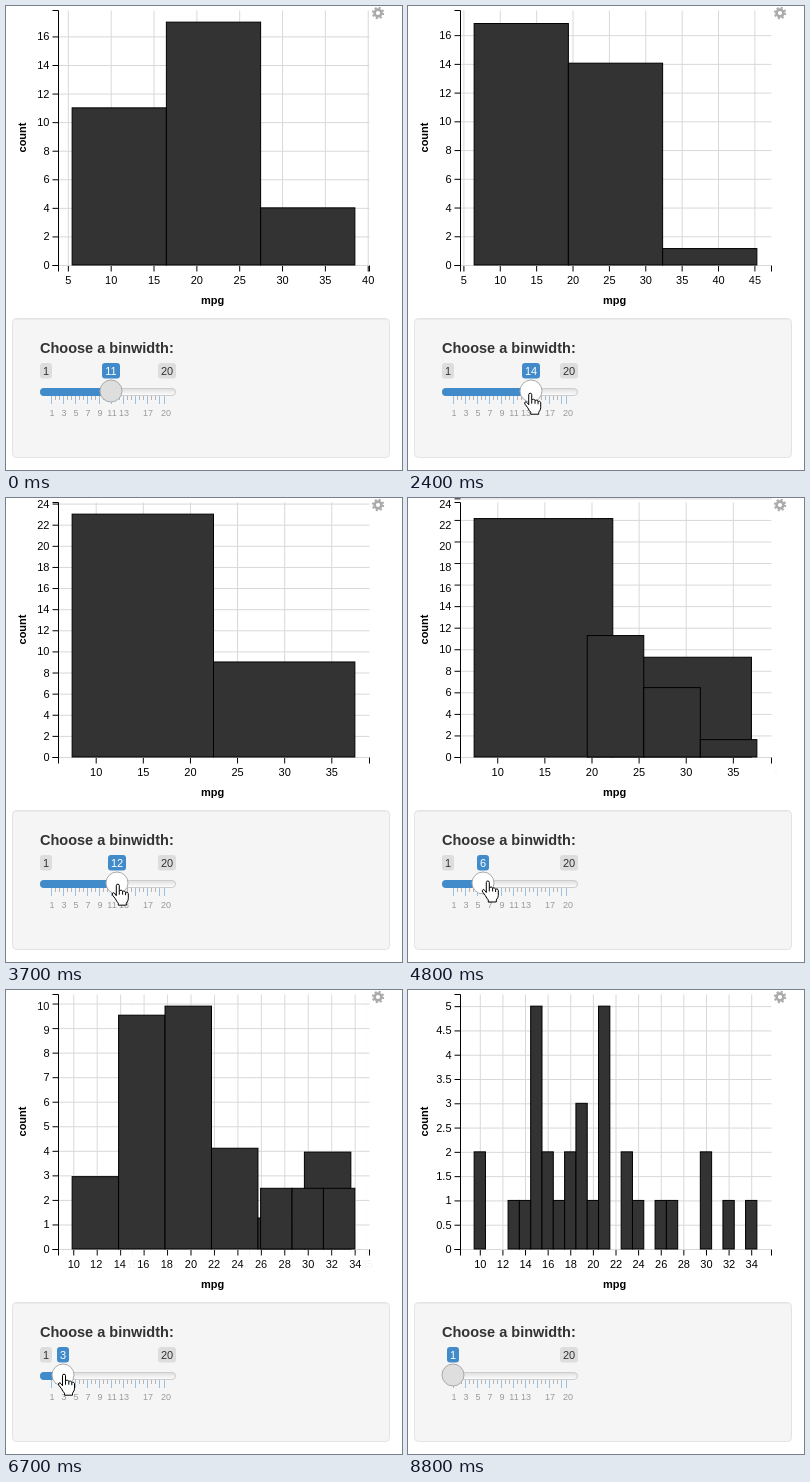
Animation of 396 by 464 pixels, one loop 9.2 s. Source, as an HTML page:

```html
<!DOCTYPE html>
<html lang="en">
<head>
<meta charset="utf-8">
<title>Histogram with a binwidth slider</title>
<style>
html, body { margin: 0; width: 100%; height: 100%; overflow: hidden; background: #fff; }
svg { display: block; font: 11px "Liberation Sans", Arial, sans-serif; }
.mid { text-anchor: middle; }
.end { text-anchor: end; }
.title { font-weight: bold; text-anchor: middle; }
.grid { stroke: #d8d8d8; }
.line { stroke: #000; fill: none; }
.bar { fill: #333; stroke: #000; }
.scale { font-size: 9px; fill: #999; text-anchor: middle; }
.cursor { fill: #fff; stroke: #000; stroke-linejoin: round; }
</style>
</head>
<body>
<svg width="396" height="464" viewBox="0 0 396 464">
  <defs>
    <linearGradient id="groove" x2="0" y2="1"><stop stop-color="#ddd"/><stop offset="1" stop-color="#fff"/></linearGradient>
    <clipPath id="clip"><path d="M0 0H369V305H0Z"/></clipPath>
  </defs>
  <g id="plot" clip-path="url(#clip)"></g>
  <text class="title" x="206.5" y="298">mpg</text>
  <text class="title" transform="translate(20 131.5) rotate(-90)">count</text>
  <g fill="none" stroke="#aaa">
    <circle cx="372" cy="7" r="3.4" stroke-width="2.6"/>
    <circle cx="372" cy="7" r="5.2" stroke-width="2" stroke-dasharray="2.042"/>
  </g>
  <rect x="6.5" y="312.5" width="377" height="139" rx="4" fill="#f5f5f5" stroke="#e3e3e3"/>
  <path d="M9 313.5H381" stroke="#ebebeb"/>
  <text x="34" y="347" font-size="14.5" font-weight="bold" fill="#333">Choose a binwidth:</text>
  <g id="scale"></g>
  <rect x="34.5" y="382.5" width="135" height="7" rx="3.5" fill="url(#groove)" stroke="#ccc"/>
  <g id="slider"></g>
  <g id="pointer"></g>
</svg>
<script>
const LOOP = 9200, STEP = 100;
const LEFT = 52.5, TOP = 4.5, WIDTH = 311, HEIGHT = 255;
const RIGHT = LEFT + WIDTH, BOTTOM = TOP + HEIGHT;
const DEBOUNCE = 260, MORPH = 250;
const DRAG_START = 1400, DRAG_END = 8200;

// Fuel economy of the 32 cars
const MPG = [21, 21, 22.8, 21.4, 18.7, 18.1, 14.3, 24.4, 22.8, 19.2, 17.8, 16.4, 17.3, 15.2, 10.4, 10.4,
  14.7, 32.4, 30.4, 33.9, 21.5, 15.5, 15.2, 13.3, 19.2, 27.3, 26, 30.4, 15.8, 19.7, 15, 21.4];

// Pointer stops: time, x
const STOPS = [[200, 165], [900, 106], [DRAG_START, 106], [1500, 110], [2390, 122], [2800, 131.6], [3300, 131],
  [4300, 83], [4500, 79.8], [5200, 79.8], [5510, 67], [6220, 67], [6515, 58], [7170, 58], [7400, 37.5],
  [DRAG_END, 37.5], [8800, 79]];

const HAND = "M4.5 2Q4.5 .5 6 .5T7.5 2V7.5Q8 6.5 9.3 6.5T10.8 8Q11.3 7.2 12.5 7.5T13.8 9Q14.3 8.3 15.3 8.6" +
  "T16.5 10V15Q16.5 17 14.5 19.5V21.5H6.5V19.5Q5 18 3.5 15L.8 11.5Q0 10 1 9.3T3 10L4.5 12ZV2" +
  "M7.5 7.5V11M10.8 8V11M13.8 9V11.5";
const ARROW = "M.5 .5V16.5L4 13L6.5 18.5L8.7 17.5L6.3 12H11Z";

const $ = id => document.getElementById(id);
const lerp = (a, b, p) => a + (b - a) * p;
const clamp = (v, lo, hi) => Math.min(hi, Math.max(lo, v));
const ease = t => t < .5 ? 4 * t ** 3 : 1 - 4 * (1 - t) ** 3;
const line = (cls, x1, y1, x2, y2) => `<path class="${cls}" d="M${x1} ${y1}L${x2} ${y2}"/>`;
const text = (cls, x, y, s) => `<text class="${cls}" x="${x}" y="${y}">${s}</text>`;

function pointerX(t) {
  const i = STOPS.findIndex(s => s[0] > t);
  if (i < 1) return STOPS.at(i)[1];
  const [[t0, x0], [t1, x1]] = STOPS.slice(i - 1, i + 1);
  return lerp(x0, x1, (t - t0) / (t1 - t0));
}

// A shallow arc along the slider, rising from and sinking below the stage
const pointerY = t => 382 + Math.abs(pointerX(t) - 75) / 10 +
  82 * Math.max(0, (900 - t) / 700, (t - DRAG_END) / 600);

const knobX = v => 45 + 6 * (v - 1);

function valueAt(t) {
  const x = pointerX(clamp(t, DRAG_START, DRAG_END));
  return clamp(Math.round((x - 47) / 6) + 1, 1, 20);
}

function ticks(lo, hi) {
  const span = hi - lo;
  let step = 10 ** Math.floor(Math.log10(span / 10));
  const err = 10 / span * step;
  step *= err <= .15 ? 10 : err <= .35 ? 5 : err <= .75 ? 2 : 1;
  const out = [];
  for (let i = Math.ceil(lo / step); i <= Math.floor(hi / step); i++) out.push(+(i * step).toFixed(2));
  return out;
}

// Bins are centred on multiples of w and closed on the right
function histogram(w) {
  const slot = MPG.map(m => Math.ceil(m / w - .5));
  const first = Math.min(...slot), last = Math.max(...slot);
  const counts = [];
  for (let k = first; k <= last; k++) counts.push(slot.filter(s => s === k).length);
  const from = (first - .5) * w, to = (last + .5) * w, pad = (to - from) * .05;
  const lo = from - pad, hi = to + pad, max = Math.max(...counts) * 1.05;
  const x = v => LEFT + (v - lo) / (hi - lo) * WIDTH;
  const y = v => BOTTOM - v / max * HEIGHT;
  const bars = counts.map((c, i) => [x(from + i * w), x(from + (i + 1) * w), y(c)]);
  return { x, y, bars, xTicks: ticks(lo, hi), yTicks: ticks(0, max) };
}

// The chart is redrawn once the slider has rested on a value
function planRedraws() {
  const list = [{ at: -LOOP, chart: histogram(valueAt(0)) }];
  let value = valueAt(0), since = -LOOP;
  for (let t = DRAG_START; t <= DRAG_END; t += 5) {
    if (valueAt(t) !== value) {
      value = valueAt(t);
      since = t;
    } else if (t === since + DEBOUNCE) list.push({ at: t, chart: histogram(value) });
  }
  return list;
}
const redraws = planRedraws();

// Ticks slide to the new scale and fade in or out; leaving labels stay put
function axis(a, b, key, p, draw) {
  const old = a[key + "Ticks"], next = b[key + "Ticks"];
  return [...new Set([...old, ...next])].map(v => {
    const leaving = !next.includes(v);
    const alpha = !old.includes(v) ? p : leaving ? 1 - p : 1;
    const pos = lerp(a[key](v), b[key](v), p);
    return alpha ? `<g opacity="${alpha}">${draw(pos, leaving ? a[key](v) : pos, v)}</g>` : "";
  }).join("");
}

function plot(t) {
  const i = redraws.findLastIndex(r => r.at <= t);
  const b = redraws[i].chart, a = redraws[Math.max(0, i - 1)].chart;
  const p = ease(clamp((t - redraws[i].at) / MORPH, 0, 1));
  const bars = b.bars.map((bar, k) => {
    const [x0, x1, y] = bar.map((v, j) => lerp((a.bars[k] || bar)[j], v, p));
    return `<rect class="bar" x="${x0}" y="${y}" width="${x1 - x0}" height="${BOTTOM - y}"/>`;
  });
  return axis(a, b, "x", p, x => line("grid", x, TOP, x, BOTTOM)) +
    axis(a, b, "x", p, (x, tx, v) => line("line", x, BOTTOM, x, BOTTOM + 6) + text("mid", tx, 278, v)) +
    `<path class="line" d="M${LEFT} ${BOTTOM + 6}V${BOTTOM}H${RIGHT}V${BOTTOM + 6}"/>` +
    axis(a, b, "y", p, y => line("grid", LEFT, y, RIGHT, y)) +
    axis(a, b, "y", p, (y, ty, v) => line("line", LEFT - 6, y, LEFT, y) + text("end", LEFT - 9, ty + 3.5, v)) +
    `<path class="line" d="M${LEFT - 6} ${TOP}H${LEFT}V${BOTTOM}H${LEFT - 6}"/>` +
    `<g transform="translate(-.5 -.5)">${bars.join("")}</g>`;
}

function tag(x, v, fill, color) {
  const w = String(v).length * 6 + 6;
  return `<rect x="${x - w / 2}" y="357" width="${w}" height="15.5" rx="3" fill="${fill}"/>` +
    `<text class="mid" x="${x}" y="368.5" fill="${color}">${v}</text>`;
}

function scale() {
  const mark = (x, h, color) => `<rect x="${x}" y="390" width="1" height="${h}" fill="${color}"/>`;
  let out = mark(knobX(20) - 1, 8, "#9cc0df") + text("scale", knobX(20) + 1, 410, 20);
  for (let v = 1; v < 20; v += 2) {
    const x = knobX(v);
    out += mark(x, 8, "#9cc0df");
    if (v < 19) out += mark(x + 4, 4, "#b5b5b5") + mark(x + 8, 4, "#b5b5b5");
    if (v < 15 || v === 17) out += text("scale", x + 1, 410, v);
  }
  return out;
}

function slider(v, hot) {
  const x = knobX(v);
  return (x - 6 < 46 ? "" : tag(40, 1, "#ddd", "#333")) + tag(161, 20, "#ddd", "#333") +
    tag(x, v, "#428bca", "#fff") +
    `<rect x="34" y="382" width="${x - 34}" height="8" rx="4" fill="#428bca"/>` +
    `<circle cx="${x}" cy="385" r="11" fill="${hot ? "#fff" : "#dedede"}" stroke="#aaa"/>`;
}

function draw(t) {
  const x = pointerX(t), y = pointerY(t), value = valueAt(t);
  const dragging = t >= DRAG_START && t <= DRAG_END;
  const hot = dragging || Math.hypot(x - knobX(value), y - 385) < 11.5;
  $("plot").innerHTML = plot(t);
  $("slider").innerHTML = slider(value, hot);
  $("pointer").innerHTML =
    `<path class="cursor" transform="translate(${x - (hot ? 6 : 0)} ${y})" d="${hot ? HAND : ARROW}"/>`;
}

$("scale").innerHTML = scale();
let shown = -1;
function frame() {
  const t = Math.floor(performance.now() % LOOP / STEP) * STEP;
  if (t !== shown) draw(shown = t);
  requestAnimationFrame(frame);
}
frame();
</script>
</body>
</html>
```
